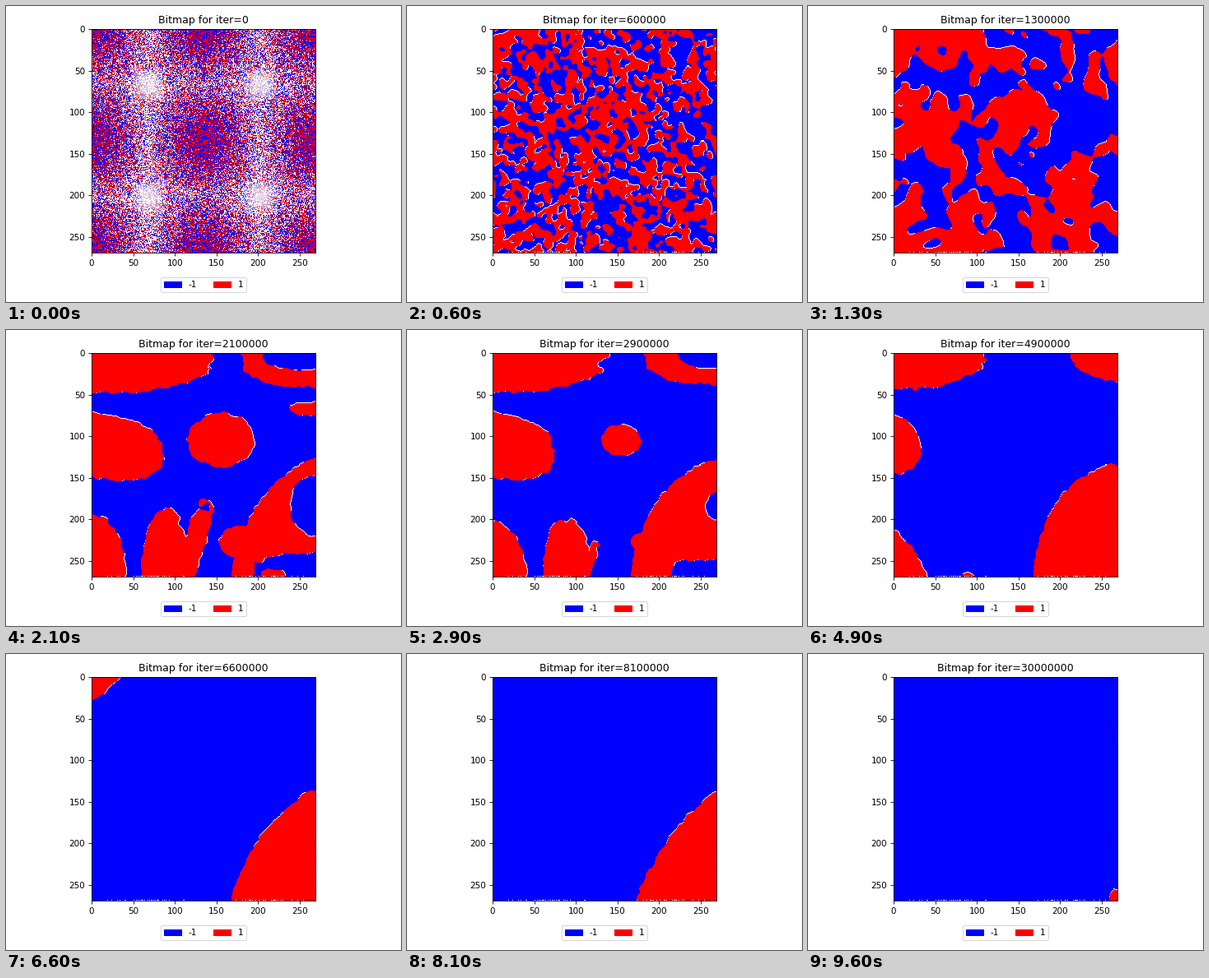
A matplotlib script for the animation above (9.7 s loop, 480 by 360 pixels).

```python
import numpy as np
import matplotlib.pyplot as plt
from matplotlib.animation import FuncAnimation
from matplotlib.patches import Patch

SIZE = 270
FRAMES = 97
STEP = 100_000
LAST_ITER = 30_000_000
SETTLED = 21  # frame at which the large domains stand alone
DPI = 75

rng = np.random.default_rng(7)
rows, cols = np.mgrid[0:SIZE, 0:SIZE]
px, py = cols + 0.5, rows + 0.5
freq = np.fft.fftfreq(SIZE)
freq2 = freq[:, None] ** 2 + freq[None, :] ** 2


def white_noise():
    return rng.normal(size=(SIZE, SIZE))


def smooth(noise, sigma):
    kernel = np.exp(-2 * np.pi ** 2 * sigma ** 2 * freq2)
    out = np.fft.ifft2(np.fft.fft2(noise) * kernel).real
    return out / out.std()


class Blob:
    """Superellipse around (x, y); keys map a frame to (width, height, power).

    After its last key it shrinks, losing area evenly, until the frame `gone`.
    """

    def __init__(self, x, y, keys, gone=None, lean_x=0, lean_y=0):
        self.x, self.y, self.gone = x, y, gone
        self.lean_x, self.lean_y = lean_x, lean_y
        self.times = list(keys)
        self.params = list(zip(*keys.values()))

    def field(self, n):
        """Rough distance to the outline, positive inside."""
        a, b, power = (np.interp(n, self.times, p) for p in self.params)
        last = self.times[-1]
        if self.gone and n > last:
            if n >= self.gone:
                return np.full((SIZE, SIZE), -99.0)
            scale = np.sqrt((self.gone - n) / (self.gone - last))
            a, b = a * scale, b * scale
        dx, dy = px - self.x, py - self.y
        u = np.abs(dx - self.lean_x * dy) / a
        v = np.abs(dy - self.lean_y * dx) / b
        return (1 - (u ** power + v ** power) ** (1 / power)) * min(a, b)


reds = [
    # top corners and the right edge
    Blob(0, 0, {21: (146, 49, 2.6), 37: (125, 47, 2.6), 49: (110, 45, 2.4),
                66: (34, 30, 1.2)}, gone=75),
    Blob(SIZE, 0, {21: (89, 43, 3), 37: (86, 36, 2.2), 49: (58, 35, 2)}, gone=62),
    Blob(SIZE, 68, {21: (29, 8, 2)}, gone=28),
    # centre and left edge
    Blob(155, 106, {21: (40, 33, 2)}, gone=33),
    Blob(0, 111, {21: (86, 39, 2.6), 37: (60, 40, 2.2), 49: (33, 35, 2)},
         gone=58, lean_y=0.14),
    # bottom edge
    Blob(0, SIZE, {21: (42, 75, 2), 37: (42, 59, 1.6), 49: (40, 53, 1.4)}, gone=62),
    Blob(89, SIZE, {21: (30, 82, 2), 37: (27, 54, 3), 49: (6, 3, 2)}, gone=51),
    Blob(112, SIZE, {21: (12, 90, 4)}, gone=31, lean_x=-0.29),
    Blob(182, 229, {21: (28, 20, 2)}, gone=33),
    Blob(SIZE, SIZE, {21: (102, 142, 1.6), 37: (106, 139, 1.8), 49: (102, 136, 1.85),
                      66: (102, 135, 1.4), 95: (92, 130, 1.15), 96: (10, 17, 3)}),
]
holes = [
    Blob(SIZE, 0, {21: (63, 22, 3), 37: (33, 18, 2)}, gone=46),
    Blob(SIZE, 185, {21: (32, 37, 2)}, gone=31),
    Blob(SIZE, SIZE, {21: (76, 29, 3), 37: (33, 13, 5)}, gone=45),
]
islet = Blob(217, SIZE, {21: (14, 9, 2)}, gone=26)


def start_state():
    cx = np.abs(np.cos(np.pi * cols / 135))
    cy = np.abs(np.cos(np.pi * rows / 135))
    fill = 0.35 + 0.65 * (0.5 * cx * cy + 0.35 * cx + 0.15 * cy)
    strength = np.clip(2 * np.maximum(cx, cy), 0.3, 1)
    sign = rng.choice([-1, 1], (SIZE, SIZE))
    return np.where(rng.random((SIZE, SIZE)) < fill, sign * strength, 0)


start = start_state()
grain = white_noise()
rough = smooth(white_noise(), 2.5)
patch = smooth(white_noise(), 6) > -0.2
visit = rng.random((SIZE, SIZE))
frozen = (start == 0) & ((rows == SIZE - 1) | (cols == SIZE - 1))


def large_scale(n):
    field = np.max([blob.field(n) for blob in reds], axis=0)
    for hole in holes:
        field = np.minimum(field, -hole.field(n))
    return np.maximum(field, islet.field(n)) + 0.8 * rough


def state(n):
    if n == 0:
        return start
    field = large_scale(n)
    if n < SETTLED:
        w = np.clip((n - 3) / (SETTLED - 3), 0, 1)
        field = (1 - w) * smooth(grain, 0.45 * n) + w * np.clip(field / 14, -1.2, 1.2)
    red = field > 0
    grid = np.where(red, 1, -1)
    # undecided cells line parts of the upper and right edges
    edge = ~red & patch & (np.roll(red, -1, axis=0) | np.roll(red, 1, axis=1))
    edge[:, 0] = edge[-1] = False
    grid[edge | frozen] = 0
    unvisited = visit < np.exp(-n * STEP / SIZE ** 2)
    return np.where(unvisited, start, grid)


def caption(n):
    count = n * STEP if n < FRAMES - 1 else LAST_ITER
    return f"Bitmap for iter={count}"


fig, ax = plt.subplots(figsize=(480 / DPI, 360 / DPI), dpi=DPI)
image = ax.imshow(start, cmap="bwr", vmin=-1, vmax=1, interpolation="nearest")
title = ax.set_title(caption(0))
ax.legend(handles=[Patch(color="blue", label="-1"), Patch(color="red", label="1")],
          ncol=2, loc="upper center", bbox_to_anchor=(0.5, -0.09))
fig.tight_layout()


def draw(n):
    image.set_data(state(n))
    title.set_text(caption(n))
    return image, title


anim = FuncAnimation(fig, draw, frames=FRAMES, interval=100, repeat=True, repeat_delay=0)
plt.show()
```
